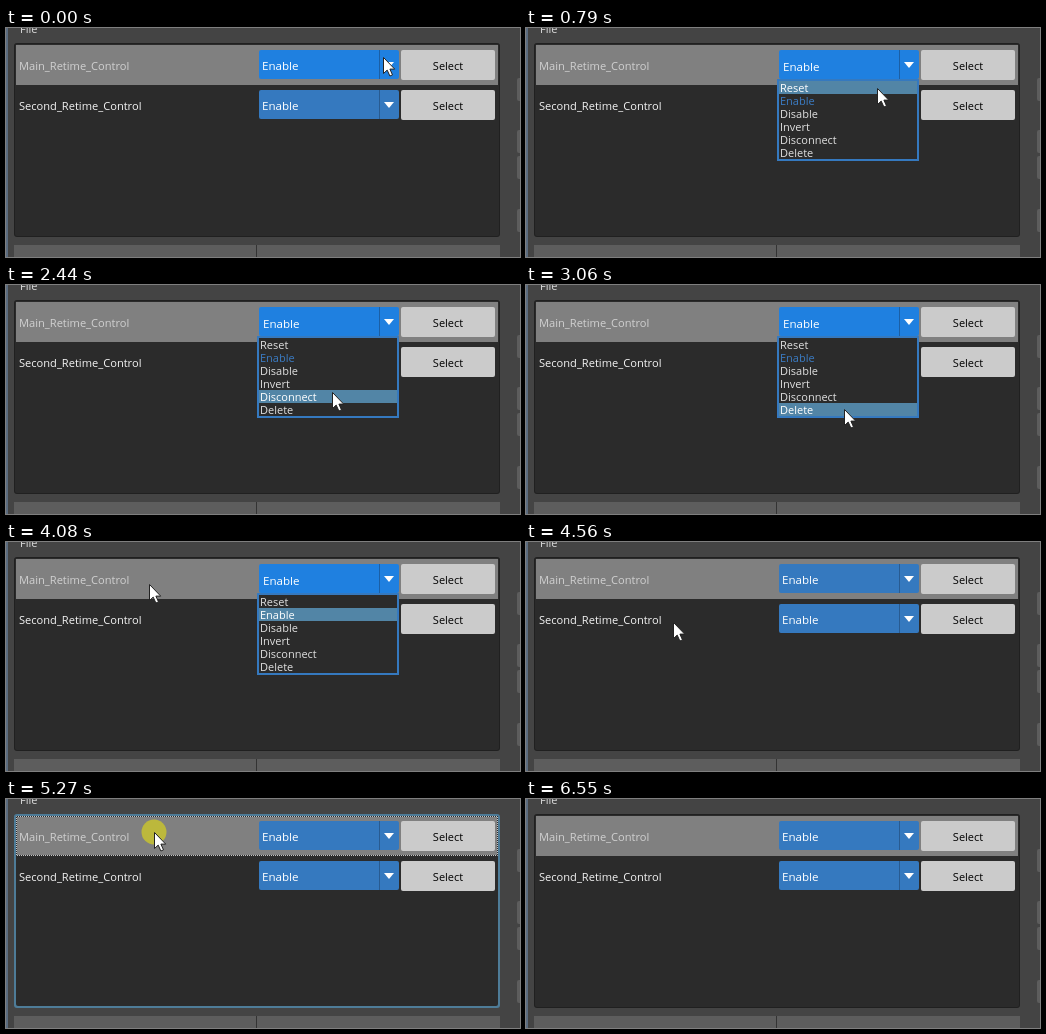
These frames come from a looping animation (514x229 px, 6.69 s). An HTML page with a canvas:

```html
<!DOCTYPE html>
<html lang="en">
<head>
<meta charset="utf-8">
<title>Retime controls</title>
<style>
  html, body { margin: 0; width: 100%; height: 100%; overflow: hidden; background: #444; }
  canvas { display: block; }
</style>
</head>
<body>
<canvas id="stage" width="514" height="229"></canvas>
<script>
const ctx = document.getElementById('stage').getContext('2d');
const LOOP = 6690, STEP = 80, HOLD = 240;
const ITEMS = ['Reset', 'Enable', 'Disable', 'Invert', 'Disconnect', 'Delete'];
const ROWS = ['Main_Retime_Control', 'Second_Retime_Control'];
const ITEM_TOP = 53, ITEM_H = 13, ROW_TOP = 17, ROW_H = 40;
const PRESS = { open: 160, close: 4160, second: 4660, first: 5190 };

// Each move: start time, duration, destination; the menu is walked down evenly
const move = (start, duration, x, y) => ({ start, duration, x, y });
const MOVES = [
  move(0, 0, 377, 29),
  move(80, 0, 380, 37),
  ...[630, 1180, 1650, 2280, 2820].map((start, i) => move(start, 240, 346 - 7 * i, 64 + 15 * i)),
  move(3680, 400, 143, 42),
  move(4320, 320, 148, 84),
  move(4960, 240, 148, 33),
  move(5740, 320, 296, 244)
];

const within = (t, from, to) => t >= from && t < to;

function pointerAt(t) {
  let x = 0, y = 0;
  for (const m of MOVES) {
    if (t < m.start) break;
    const elapsed = (Math.floor((t - m.start) / STEP) + 1) * STEP;
    const p = Math.min(1, elapsed / (m.duration + STEP));
    const ease = p * p * (3 - 2 * p);
    x += (m.x - x) * ease;
    y += (m.y - y) * ease;
  }
  return [Math.round(x), Math.round(y)];
}

function rect(x, y, w, h, color, radius = 0) {
  ctx.fillStyle = color;
  ctx.beginPath();
  ctx.roundRect(x, y, w, h, radius);
  ctx.fill();
}

function text(str, x, y, color, size = 11, align = 'left') {
  ctx.font = `${size}px "Open Sans", sans-serif`;
  ctx.textAlign = align;
  ctx.fillStyle = color;
  ctx.fillText(str, x, y);
}

function polygon(points, fill) {
  ctx.beginPath();
  points.forEach(([x, y]) => ctx.lineTo(x, y));
  ctx.closePath();
  ctx.fillStyle = fill;
  ctx.fill();
}

function drawFocus(x, y, w, h) {
  ctx.lineWidth = 1;
  ctx.strokeStyle = '#2b2b2b';
  ctx.strokeRect(x + .5, y + .5, w - 1, h - 1);
  ctx.strokeStyle = '#c4c4c4';
  ctx.setLineDash([1, 1]);
  ctx.lineDashOffset = .5;
  ctx.strokeRect(x + .5, y + .5, w - 1, h - 1);
  ctx.setLineDash([]);
}

function drawWindow(focused) {
  rect(0, 0, 514, 229, '#444');
  rect(0, 0, 2, 229, '#5b6c80');
  text('File', 14, 5, '#ddd');
  for (const y of [50, 102, 128, 181]) rect(511, y, 6, 23, '#5d5d5d', 2);
  rect(8, 217, 486, 12, '#333');
  rect(8, 217, 242, 12, '#5d5d5d');
  rect(251, 217, 243, 12, '#5d5d5d');
  const border = focused ? 2 : 1;
  rect(8, 15, 486, 194, focused ? '#4e7c98' : '#202020', 3);
  rect(8 + border, 15 + border, 486 - 2 * border, 194 - 2 * border, '#2b2b2b', 2);
}

function drawRow(index, selected, focused, hot, open) {
  const y = ROW_TOP + index * ROW_H;
  const shift = open ? 1 : 0;
  if (selected) rect(10, y, 482, ROW_H, '#808080');
  if (selected && focused) drawFocus(10, y, 482, ROW_H);
  text(ROWS[index], 13, y + 25, selected ? '#d0d0d0' : '#f4f4f4', 11.1);
  rect(253, y + 5, 140, 29, hot ? '#1f80e0' : '#3579bf', 2);
  rect(373, y + 5, 1, 29, hot ? '#1b5fa5' : '#285b91');
  text('Enable', 256 + shift, y + 25 + shift, '#fff', 11.6);
  polygon([[378, y + 17], [388, y + 17], [383, y + 23]], '#fff');
  rect(395, y + 5, 94, 30, '#cbcbcb', 2);
  text('Select', 442, y + 25, '#000', 11, 'center');
}

function drawPopup(x, y) {
  const inside = within(x, 253, 391) && within(y, ITEM_TOP, ITEM_TOP + ITEMS.length * ITEM_H);
  const active = inside ? Math.floor((y - ITEM_TOP) / ITEM_H) : 1;
  rect(251, 51, 142, 82, '#3579bf');
  rect(253, ITEM_TOP, 138, ITEMS.length * ITEM_H, '#2b2b2b');
  rect(253, ITEM_TOP + active * ITEM_H, 138, ITEM_H, '#5285a6');
  ITEMS.forEach((item, i) => {
    const color = i === active ? '#fff' : i === 1 ? '#3b7cc4' : '#e0e0e0';
    text(item, 254, ITEM_TOP + 11 + i * ITEM_H, color);
  });
}

function drawPointer(x, y, pressed) {
  if (pressed) rect(x - 12.5, y - 12.5, 25, 25, 'rgba(202,198,42,.8)', 12.5);
  ctx.save();
  ctx.translate(x + .5, y + .5);
  polygon([[0, 0], [0, 16], [3.7, 12.6], [6.4, 18.5], [9, 17.4], [6.4, 11.6], [11.2, 11.6]], '#fff');
  ctx.strokeStyle = '#222';
  ctx.lineWidth = 1;
  ctx.stroke();
  ctx.restore();
}

function draw(t) {
  const [x, y] = pointerAt(t);
  const focused = within(t, PRESS.second, 6550);
  const open = within(t, PRESS.open + STEP, PRESS.close);
  const hot = t < PRESS.close + 2 * STEP;
  const selected = within(t, PRESS.second, PRESS.first) ? 1 : 0;
  drawWindow(focused);
  ROWS.forEach((_, i) => drawRow(i, i === selected, focused, i === 0 && hot, i === 0 && open));
  if (open) drawPopup(x, y);
  drawPointer(x, y, Object.values(PRESS).some(start => within(t, start, start + HOLD)));
}

function tick() {
  draw(performance.now() % LOOP);
  requestAnimationFrame(tick);
}
tick();
</script>
</body>
</html>
```
